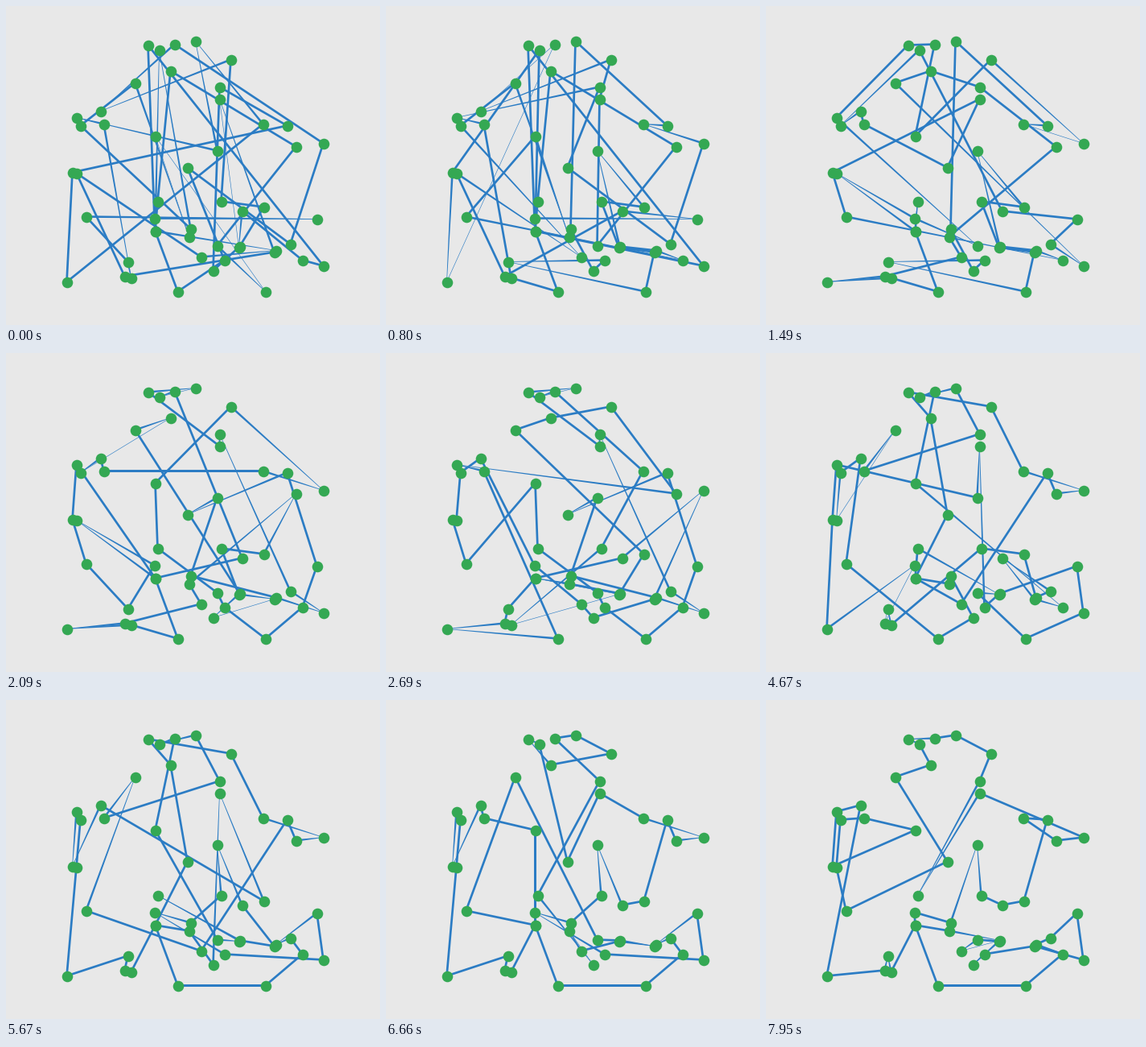
These frames come from a looping animation (465 px wide and 396 px high, 8000 ms). A matplotlib script:

```python
import numpy as np
import matplotlib.pyplot as plt
from matplotlib.animation import FuncAnimation
from matplotlib.collections import PolyCollection

W, H, DPI = 465, 396, 100
LOOP, TICK = 8000, 20
BACK, LINE, NODE = "#e8e8e8", "#2b7cc4", "#34a853"
FULL, THIN = 1.35, 0.3          # half widths of an edge
SHARP = np.radians(29)          # corners narrower than this taper

cities = np.array([
    (176, 48), (190, 54), (209, 47), (235, 43), (279, 66),
    (204, 80), (160, 95), (265, 100), (265, 115), (117, 130),
    (87, 138), (92, 148), (121, 146), (185, 161), (319, 146),
    (349, 148), (360, 174), (394, 170), (262, 179), (225, 200),
    (82, 206), (87, 207), (188, 242), (267, 242), (293, 254),
    (320, 249), (99, 261), (184, 263), (185, 279), (229, 276),
    (227, 286), (386, 264), (262, 297), (290, 298), (353, 295),
    (333, 305), (335, 303), (242, 311), (271, 315), (257, 328),
    (368, 315), (394, 322), (151, 317), (147, 335), (155, 337),
    (75, 342), (213, 354), (322, 354), (289, 299), (185, 279),
]) + 0.5

stages = []


def stage(time, *tour):
    stages.append((time, list(tour)))


stage(0, 8, 35, 43, 21, 37, 36, 49, 22, 5, 16, 32, 47, 13, 30, 6, 11, 29,
      1, 28, 46, 38, 19, 34, 17, 2, 9, 4, 23, 25, 33, 39, 7, 15, 20, 45,
      14, 3, 18, 10, 12, 44, 42, 26, 31, 27, 0, 41, 40, 24, 48)
stage(1490, 0, 2, 13, 4, 17, 14, 15, 3, 29, 39, 38, 42, 47, 35, 48, 23, 25,
      18, 33, 36, 40, 26, 20, 8, 19, 12, 9, 11, 1, 24, 31, 34, 41, 6, 5,
      7, 16, 30, 37, 43, 45, 44, 46, 28, 22, 49, 21, 27, 32, 10)
stage(2690, 24, 49, 42, 43, 45, 46, 12, 10, 16, 4, 5, 6, 25, 33, 30, 28, 48,
      44, 23, 14, 2, 1, 3, 0, 8, 7, 34, 41, 36, 29, 18, 19, 15, 31, 40,
      47, 38, 32, 22, 13, 26, 20, 21, 11, 9, 27, 37, 39, 35, 17)
stage(3580, 33, 19, 42, 29, 22, 49, 44, 23, 31, 14, 15, 2, 1, 3, 7, 8, 41,
      25, 40, 36, 34, 18, 10, 26, 27, 37, 17, 16, 39, 43, 45, 46, 38, 47,
      35, 48, 28, 30, 5, 13, 4, 0, 12, 9, 20, 21, 11, 6, 24, 32)
stage(4670, 28, 19, 5, 0, 4, 14, 17, 16, 15, 37, 49, 22, 48, 32, 47, 41, 31,
      33, 38, 8, 18, 10, 20, 45, 27, 43, 42, 44, 23, 25, 36, 34, 24, 35,
      40, 13, 2, 1, 3, 7, 12, 6, 21, 11, 9, 26, 46, 39, 29, 30)
stage(6660, 0, 5, 4, 3, 2, 7, 22, 39, 30, 37, 48, 35, 33, 32, 6, 26, 28,
      13, 12, 9, 20, 10, 11, 21, 45, 42, 43, 44, 49, 46, 47, 40, 34, 36,
      31, 41, 38, 27, 29, 23, 18, 24, 25, 15, 16, 17, 14, 8, 19, 1)
stage(7950, 0, 2, 3, 4, 7, 22, 8, 17, 16, 14, 15, 25, 24, 23, 18, 29, 27,
      28, 30, 33, 37, 32, 48, 39, 38, 35, 41, 31, 34, 36, 40, 47, 46, 49,
      44, 42, 43, 45, 9, 10, 20, 13, 12, 11, 21, 26, 19, 6, 5, 1)

bursts = [(500, 1200, 8), (1390, 2190, 9), (2290, 3090, 9),
          (3190, 3970, 9), (4070, 4870, 9), (4970, 5770, 9),
          (5860, 6260, 5), (6460, 7060, 7), (7250, 7950, 8)]
times = np.concatenate([np.linspace(*b) for b in bursts])


def reversals(a, b):
    """Tours met while turning a into b by reversing stretches."""
    k = a.index(b[0])
    p = a[k:] + a[:k]
    path = [p]
    for i in range(1, len(p)):
        if p[i] != b[i]:
            j = p.index(b[i])
            p = p[:i] + p[i:j + 1][::-1] + p[j + 1:]
            path.append(p)
    return path


def shortest(a, b):
    options = []
    for goal in (b, b[::-1]):
        for k in range(len(b)):
            options.append(reversals(a, goal[k:] + goal[:k]))
    return min(options, key=len)


def edges(tour):
    """One quad per edge, tapered towards sharp corners."""
    p = cities[tour]
    q = np.roll(p, -1, axis=0)
    d = q - p
    d = d / np.maximum(np.hypot(d[:, 0], d[:, 1]), 1e-6)[:, None]
    turn = np.clip(-(np.roll(d, 1, axis=0) * d).sum(axis=1), -1, 1)
    half = np.where(np.arccos(turn) < SHARP, THIN, FULL)
    n = np.column_stack((-d[:, 1], d[:, 0]))
    u = n * half[:, None]
    v = n * np.roll(half, -1)[:, None]
    return np.stack((p + u, q + v, q - v, p - u), axis=1)


tours = [stages[0][1]]
for (t0, a), (t1, b) in zip(stages, stages[1:]):
    steps = int(((times > t0 + 1) & (times < t1 + 1)).sum())
    path = shortest(a, b)
    for s in range(1, steps + 1):
        tours.append(path[round((len(path) - 1) * s / steps)])
shapes = [edges(t) for t in tours]

fig = plt.figure(figsize=(W / DPI, H / DPI), dpi=DPI, facecolor=BACK)
ax = fig.add_axes([0, 0, 1, 1])
ax.set_xlim(0, W)
ax.set_ylim(H, 0)
ax.axis("off")

lines = PolyCollection(shapes[0], facecolors=LINE, edgecolors="none", zorder=1)
ax.add_collection(lines, autolim=False)
ax.plot(cities[:, 0], cities[:, 1], "o", ms=13.6 * 72 / DPI, mew=0,
        color=NODE, zorder=2)


def draw(frame):
    now = frame * TICK + TICK / 2
    lines.set_verts(shapes[np.searchsorted(times, now, side="right")])
    return [lines]


anim = FuncAnimation(fig, draw, frames=LOOP // TICK, interval=TICK,
                     repeat=True, repeat_delay=0, blit=False)
plt.show()
```
